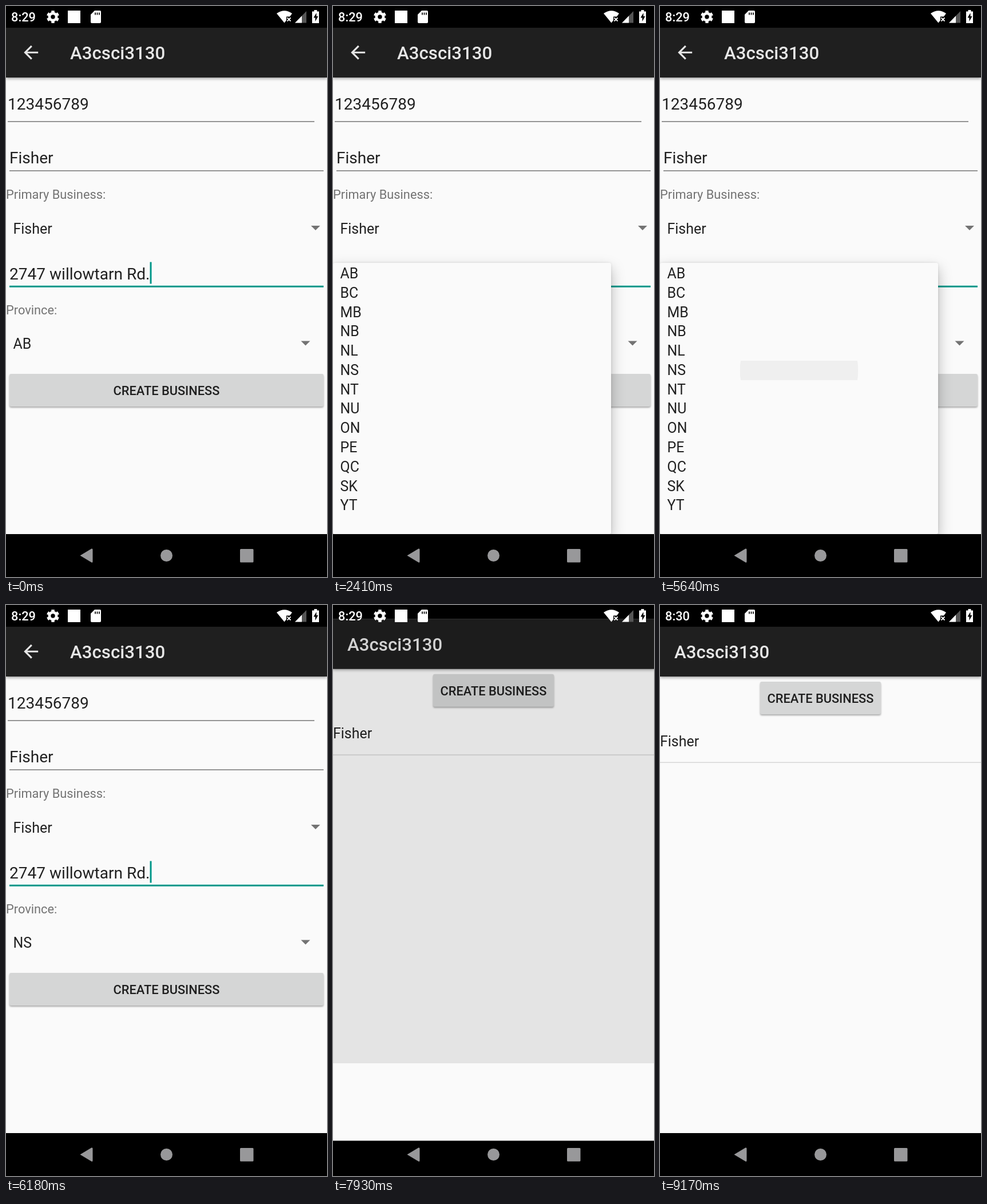
An HTML page that plays this animation: 561x998 px, repeating every 9.29 s.

```html
<!DOCTYPE html>
<html lang="en">
<head>
<meta charset="utf-8">
<title>Business form</title>
<style>
  /* One loop is 9290 ms, so 1% is 92.9 ms. */
  html, body { margin: 0; width: 100%; height: 100%; overflow: hidden; background: #000; }
  #stage { position: relative; width: 561px; height: 998px; overflow: hidden; background: #000; font-family: Roboto, sans-serif; }
  #stage * { box-sizing: border-box; }
  #stage div, svg { position: absolute; }
  svg { left: 0; top: 0; width: 561px; height: 998px; }
  #stage [class*="a-"] { animation-duration: 9290ms; animation-iteration-count: infinite; animation-timing-function: linear; }

  .window { inset: 0; background: #000; overflow: hidden; }
  .content { left: 0; top: 37.5px; width: 561px; height: 885.5px; background: #fafafa; overflow: hidden; }
  .bar { left: 0; top: 0; width: 561px; height: 87px; background: #1f1f1f; box-shadow: 0 2px 5px rgba(0,0,0,.38); }
  .button { background: #d5d6d6; border-radius: 3px; box-shadow: 0 2px 3px rgba(0,0,0,.32);
    font: 500 21.8px/57px Roboto, sans-serif; padding-top: 1px; color: #1f1f1f; text-align: center; white-space: nowrap; }
  .popup { left: 0; top: 411.5px; width: 486px; height: 474px; padding: 2px 0 0 12.5px; background: #fafafa;
    border-radius: 3px; box-shadow: 0 10px 24px rgba(0,0,0,.27), 0 0 5px rgba(0,0,0,.1);
    font-size: 24.93px; line-height: 33.78px; color: #212121; }
  .row { left: 0; top: 171px; width: 486px; height: 33.8px; background: rgba(0,0,0,.12); }

  text { fill: #212121; }
  .title { font-size: 31.2px; font-weight: 500; fill: #e6e6e6; }
  .field { font-size: 28.05px; }
  .item { font-size: 24.93px; }
  .label { font-size: 21.8px; fill: #737373; }
  .clock { font-size: 21.8px; font-weight: 500; fill: #fff; }
  .arrow { fill: #737373; }
  .ripple { fill: #000; transform-origin: 521px 589.5px; }

  .a-cursor { animation-name: cursor; }
  .a-old { animation-name: old; }
  .a-new { animation-name: new; }
  .a-early { animation-name: early; }
  .a-late { animation-name: late; }
  .a-ripple { animation-name: ripple; }
  .a-popup { animation-name: popup; }
  .a-row { animation-name: row; }
  .a-press { animation-name: press; }
  .a-close { animation-name: slide-out, wipe; }
  .a-return { animation-name: slide-in, undim; }

  @keyframes cursor {
    0%, 5.705%, 16.469%, 66.5%, 78.25% { opacity: 1; animation-timing-function: step-end; }
    .861%, 11.087%, 21.852%, 72.87%, 82.562%, 100% { opacity: 0; animation-timing-function: step-end; }
  }
  @keyframes old { 0% { opacity: 1; animation-timing-function: step-end; } 64.047%, 100% { opacity: 0; } }
  @keyframes new { 0% { opacity: 0; animation-timing-function: step-end; } 64.047%, 100% { opacity: 1; } }
  @keyframes early { 0% { opacity: 1; animation-timing-function: step-end; } 98.7%, 100% { opacity: 0; } }
  @keyframes late { 0% { opacity: 0; animation-timing-function: step-end; } 98.7%, 100% { opacity: 1; } }

  @keyframes ripple {
    0%, 18.084% { opacity: 0; transform: scale(.3); animation-timing-function: ease-out; }
    19.9%, 20.56% { opacity: .115; transform: none; }
    22.067%, 100% { opacity: 0; transform: none; }
  }
  @keyframes popup {
    0%, 23.681% { opacity: 0; clip-path: inset(112px 0 305px 0); animation-timing-function: cubic-bezier(.4,0,.2,1); }
    24.758% { opacity: 1; }
    25.942% { opacity: 1; clip-path: inset(-50px); }
    64.047% { opacity: 1; clip-path: inset(-50px); }
    66.2%, 100% { opacity: 0; clip-path: inset(-50px); }
  }
  @keyframes row {
    0%, 60.28% { opacity: 0; clip-path: circle(20px at 50% 50%); animation-timing-function: ease-out; }
    62.217%, 64.047% { opacity: 1; clip-path: circle(260px at 50% 50%); }
    66.2%, 100% { opacity: 0; clip-path: circle(260px at 50% 50%); }
  }
  @keyframes press {
    0%, 80.409% { background: #d5d6d6; box-shadow: 0 2px 3px rgba(0,0,0,.32); }
    81.593%, 100% { background: #cacaca; box-shadow: 0 6px 8px rgba(0,0,0,.32); }
  }
  @keyframes slide-out {
    0%, 84.069% { transform: none; animation-timing-function: cubic-bezier(.4,0,.2,1); }
    88.644%, 100% { transform: translateY(41px); }
  }
  @keyframes wipe {
    0% { clip-path: inset(0 0 0 0); }
    84.069% { clip-path: inset(0 0 0 0); animation-timing-function: cubic-bezier(.3,0,.8,.15); }
    84.831% { clip-path: inset(383px 0 0 0); animation-timing-function: cubic-bezier(.05,.7,.1,1); }
    88.644%, 100% { clip-path: inset(957px 0 0 0); }
  }
  @keyframes slide-in {
    0%, 84.069% { transform: translateY(-19.6px); animation-timing-function: cubic-bezier(.4,0,.2,1); }
    88.644%, 100% { transform: none; }
  }
  @keyframes undim {
    0%, 84.069% { opacity: .9; animation-timing-function: cubic-bezier(.33,0,1,1); }
    88.644%, 100% { opacity: 1; }
  }
</style>
</head>
<body>
<div id="stage">

  <div class="window a-return">
    <div class="content">
      <div class="bar"></div>
      <div class="button" style="left:175px;top:96px;width:211px;height:57px">CREATE BUSINESS</div>
    </div>
    <svg>
      <text class="title" x="25" y="93">A3csci3130</text>
      <text class="item" x="0" y="246.5">Fisher</text>
      <path d="M0 275.2H561" stroke="#d6d6d6" stroke-width="1.6"/>
    </svg>
  </div>

  <div class="window a-close">
    <div class="content">
      <div class="bar"></div>
      <div class="button a-press" style="left:6px;top:605.5px;width:549px;height:57px">CREATE BUSINESS</div>
    </div>
    <svg>
      <path transform="translate(25 62.5) scale(1.558)" fill="#e6e6e6"
        d="M20 11H7.83l5.59-5.59L12 4l-8 8 8 8 1.41-1.41L7.83 13H20z"/>
      <text class="title" x="112" y="93">A3csci3130</text>

      <text class="field" x="3" y="180.5">123456789</text>
      <path d="M3 202H539M6 288H555" stroke="#747474" stroke-width="1.6"/>
      <text class="field" x="6" y="274.5">Fisher</text>

      <text class="label" x="0" y="337">Primary Business:</text>
      <text class="item" x="12.5" y="397.5">Fisher</text>
      <path class="arrow" d="M533 384h16l-8 8z"/>

      <text class="field" x="6" y="477.5">2747 willowtarn Rd.</text>
      <path d="M6 490.2H555" stroke="#009688" stroke-width="3"/>
      <rect class="a-cursor" x="251.5" y="447.5" width="3" height="38" fill="#009688"/>

      <text class="label" x="0" y="538.5">Province:</text>
      <text class="item a-old" x="12.5" y="599">AB</text>
      <text class="item a-new" x="12.5" y="599">NS</text>
      <circle class="ripple a-ripple" cx="521" cy="589.5" r="28.7"/>
      <path class="arrow" d="M515.5 585.5h16l-8 8z"/>
    </svg>
    <div class="content" style="background:none">
      <div class="popup a-popup">
        AB<br>BC<br>MB<br>NB<br>NL<br>NS<br>NT<br>NU<br>ON<br>PE<br>QC<br>SK<br>YT
        <div class="row a-row"></div>
      </div>
    </div>
  </div>

  <svg>
    <text class="clock a-early" x="9" y="27.2">8:29</text>
    <text class="clock a-late" x="9" y="27.2">8:30</text>
    <g fill="none" stroke="#fff">
      <circle cx="82" cy="19" r="6.1" stroke-width="4.8"/>
      <circle cx="82" cy="19" r="9.2" stroke-width="3.6" pathLength="6" stroke-dasharray=".56 .44" stroke-dashoffset="-.22"/>
    </g>
    <g fill="#fff">
      <rect x="108" y="8" width="22" height="22"/>
      <path d="M155 8h9q2 0 2 2v18q0 2-2 2h-14q-2 0-2-2V15z"/>
      <path d="M473 13Q486.500 3.500 500 13L496 18.500H490V25L486.500 29.500z"/>
      <path d="M505 29.500L525 9V29.500z" fill="#555"/>
      <path d="M505 29.500L517 17.200V29.500z"/>
      <path d="M538.500 7h5v2.500H547V30H535V9.500h3.500z"/>
    </g>
    <path d="M491.500 20.500l6 6m0-6l-6 6" stroke="#fff" stroke-width="1.8"/>
    <path d="M542.500 12l-5 8.500h3v6.500l5-9h-3z"/>
    <path d="M156 11.500v4M159.500 11.500v4M163 11.500v4" stroke="#000" stroke-width="1.700"/>
    <g fill="#98989a">
      <path d="M129.500 960.500L149.500 948.500Q151.500 948 151.500 950V971Q151.500 973.500 149.500 972.500z"/>
      <circle cx="280.500" cy="960.500" r="10.500"/>
      <rect x="409" y="949" width="23.500" height="23.500" rx="1.500"/>
    </g>
  </svg>
</div>
</body>
</html>
```
